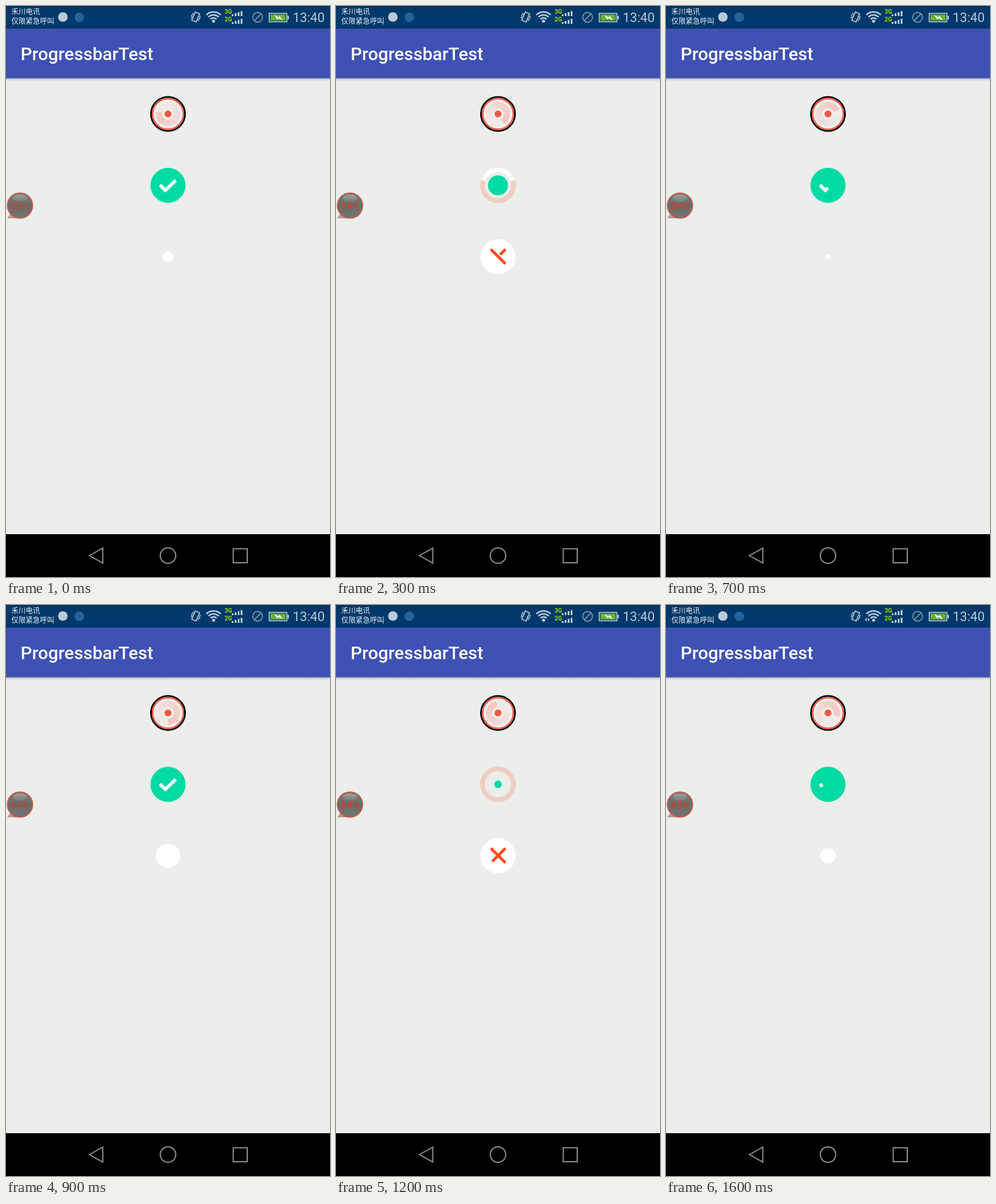
An HTML page with a canvas for the animation above (1.7 s loop, 544x960 px).

```html
<!DOCTYPE html>
<html>
<head>
<meta charset="utf-8">
<style>
html, body { margin: 0; width: 100%; height: 100%; overflow: hidden; background: #ebeeeb; }
canvas { display: block; }
</style>
</head>
<body>
<canvas id="stage" width="544" height="960"></canvas>
<script>
const c = document.getElementById('stage').getContext('2d');
const TAU = Math.PI * 2, CX = 272;
const RED = '#ee5844', ORANGE = '#ff4a17', GREEN = '#00dba4', ICON = '#b9cbd9';

const clamp = t => Math.max(0, Math.min(1, t));
const ease = t => (1 - Math.cos(Math.PI * clamp(t))) / 2;
const wrap = (v, n) => ((v % n) + n) % n;

function rect(x, y, w, h, fill) {
  c.fillStyle = fill;
  c.fillRect(x, y, w, h);
}
function disc(x, y, r, fill) {
  c.fillStyle = fill;
  c.beginPath();
  c.arc(x, y, r, 0, TAU);
  c.fill();
}
function arc(x, y, r, width, color, from = 0, to = TAU) {
  c.strokeStyle = color;
  c.lineWidth = width;
  c.beginPath();
  c.arc(x, y, r, from, to);
  c.stroke();
}
function line(points, width, color, close) {
  c.strokeStyle = color;
  c.lineWidth = width;
  c.beginPath();
  points.forEach(([x, y]) => c.lineTo(x, y));
  if (close) c.closePath();
  c.stroke();
}
function text(s, x, y, font, fill, align = 'left') {
  c.font = font;
  c.fillStyle = fill;
  c.textAlign = align;
  c.fillText(s, x, y);
}
function fade(y0, y1, ...colors) {
  const g = c.createLinearGradient(0, y0, 0, y1);
  colors.forEach((color, i) => g.addColorStop(i / (colors.length - 1), color));
  return g;
}
// Strokes the first part of a polyline, measured along its length.
function partial(points, share, width, color) {
  if (share <= 0) return;
  const lengths = points.slice(1).map((p, i) => Math.hypot(p[0] - points[i][0], p[1] - points[i][1]));
  let left = clamp(share) * lengths.reduce((a, b) => a + b);
  const drawn = [points[0]];
  for (let i = 0; i < lengths.length && left > 0; i++) {
    const [x0, y0] = points[i], [x1, y1] = points[i + 1];
    const f = Math.min(1, left / lengths[i]);
    drawn.push([x0 + (x1 - x0) * f, y0 + (y1 - y0) * f]);
    left -= lengths[i];
  }
  line(drawn, width, color);
}

function statusBar(step) {
  rect(0, 0, 544, 38, fade(0, 38, '#063565', '#003a6c', '#00376a'));
  const cjk = '12px "Noto Sans CJK SC", "Noto Sans CJK", sans-serif';
  text('禾川电讯', 9, 13.5, cjk, '#eef2f5');
  text('仅限紧急呼叫', 9, 29.5, cjk, '#eef2f5');
  disc(95.5, 18.5, 8, ICON);
  disc(123, 19, 8, '#24639a');

  c.save();
  c.translate(318.5, 18.5);
  c.rotate(0.4);
  c.strokeStyle = ICON;
  c.lineWidth = 1.7;
  c.strokeRect(-4, -7.5, 8, 15);
  for (const s of [-1, 1])
    line([[s * 7, -5], [s * 6, -2.5], [s * 7.5, 0], [s * 6, 2.5], [s * 7, 5]], 1.3, ICON);
  c.restore();

  for (const r of [7, 12, 17]) arc(348.5, 27, r, 2.6, ICON, -2.36, -0.78);
  disc(348.5, 25.5, 2.6, ICON);
  if (step === 16) {
    for (const [x, s] of [[337, -1], [339, 1]]) {
      c.beginPath();
      c.moveTo(x, 21); c.lineTo(x + s * 3, 24.5); c.lineTo(x, 28);
      c.fill();
    }
  }
  ['3G', '2G'].forEach((label, row) => {
    const y = 13 + row * 13;
    text(label, 367, y, 'bold 10px Roboto, sans-serif', '#9bd900');
    for (let i = 0; i < 4; i++) {
      const h = 3 + i * 1.8;
      rect(379 + i * 5, y + 4 - h, 3, h, ICON);
    }
  });

  arc(422.5, 19, 8.2, 1.7, '#7e9ab2');
  line([[416.8, 24.8], [428.2, 13.2]], 1.7, '#7e9ab2');
  c.strokeStyle = ICON;
  c.lineWidth = 1.7;
  c.strokeRect(442, 12.5, 29.5, 14);
  rect(472.5, 16.5, 2.5, 6, ICON);
  rect(444, 14.5, 25.5, 10, '#65b52f');
  c.fillStyle = '#f2f6f0';
  c.beginPath();
  [[450, 15], [458, 19], [459, 16], [465, 24], [457, 20.5], [456, 23]].forEach(p => c.lineTo(...p));
  c.fill();
  text('13:40', 535, 27, '21.5px Roboto, sans-serif', '#b9c9d6', 'right');
}

function frameParts(step) {
  rect(0, 0, 544, 960, '#ebeeeb');
  rect(0, 121, 544, 6, fade(121, 127, '#a9acb4', '#d8dad9', '#ebeeeb'));
  rect(0, 38, 544, 83.5, '#3f51b2');
  text('ProgressbarTest', 24.5, 91, '500 30px Roboto, sans-serif', '#fff');
  statusBar(step);

  rect(0, 888, 544, 72, '#000');
  const nav = '#8f8f8f';
  line([[140, 924], [162.5, 911.5], [162.5, 936.5]], 2, nav, true);
  arc(CX, 924, 13, 2, nav);
  line([[381.5, 912.5], [405, 912.5], [405, 936], [381.5, 936]], 2, nav, true);
}

function badge(step) {
  c.fillStyle = '#b69a91';
  c.beginPath();
  c.moveTo(2, 357); c.lineTo(9, 347); c.lineTo(23, 357);
  c.fill();
  disc(23.5, 335.5, 21, fade(314, 357, '#777b78', '#696c69', '#737673'));
  c.fillStyle = fade(316, 330, '#a0a4a1', '#747774');
  c.beginPath();
  c.ellipse(23.5, 323, 12, 6, 0, 0, TAU);
  c.fill();
  arc(23.5, 335.5, 21.2, 1.8, '#d35543');
  const label = step < 1 ? '50%' : step < 5 ? '94%' : '84%';
  text(label, 23.5, 341.5, '16.5px Roboto, sans-serif', '#cf3d27', 'center');
}

// [step, degrees] of the leading edge of the sweep
const SWEEP = [[0, -170], [3, 60], [5, 320], [7, 340], [10, 505], [12, 622], [16, 740]];
function radar(step) {
  const y = 181.5;
  const i = Math.max(1, SWEEP.findIndex(p => p[0] >= step));
  const [s0, a0] = SWEEP[i - 1], [s1, a1] = SWEEP[i];
  const angle = (a0 + (a1 - a0) * (step - s0) / (s1 - s0)) * Math.PI / 180;
  disc(CX, y, 28, '#efecea');
  const g = c.createConicGradient(angle, CX, y);
  g.addColorStop(0, 'rgba(246,176,166,0)');
  g.addColorStop(0.25, 'rgba(246,176,166,.1)');
  g.addColorStop(1, 'rgba(246,176,166,.65)');
  arc(CX, y, 15, 10, g);
  arc(CX, y, 28.6, 2.8, '#000');
  arc(CX, y, 25.9, 2.6, RED);
  disc(CX, y, 5.8, RED);
}

function success(step) {
  const y = 301.5, u = wrap(step - 0.02, 9.95);
  c.globalAlpha = 1 - 0.8 * clamp((u - 0.1) / 0.8);
  if (u < 4.8) arc(CX, y, 26, 8, ORANGE);
  c.globalAlpha = 1;
  if (u > 2.5 && u < 3.5) arc(CX, y, 26, 8, '#fdfdfc', -2.82, -0.32);
  disc(CX, y, 29.5 * ease((u - 0.8) / 4), GREEN);
  partial([[258.5, 301], [267.5, 310], [285, 293]], ease((u - 5) / 3.9), 5.5, '#fff');
}

function failure(step) {
  const y = 421.5, w = wrap(step + 2.38, 7.75) - 2.38;
  disc(CX, y, 29.5 * clamp(0.548 + 0.23 * w) ** 2, '#fff');
  partial([[260, 409], [284.5, 433.5]], clamp((w - 2.05) / 0.7) ** 2, 4.6, ORANGE);
  partial([[284.5, 409], [260, 433.5]], Math.sqrt(clamp((w - 2.75) / 1.85)), 4.6, ORANGE);
}

function draw(now) {
  const step = Math.floor(wrap(now, 1700) / 100);
  for (const paint of [frameParts, badge, radar, success, failure]) paint(step);
  requestAnimationFrame(draw);
}
draw(performance.now());
</script>
</body>
</html>
```
